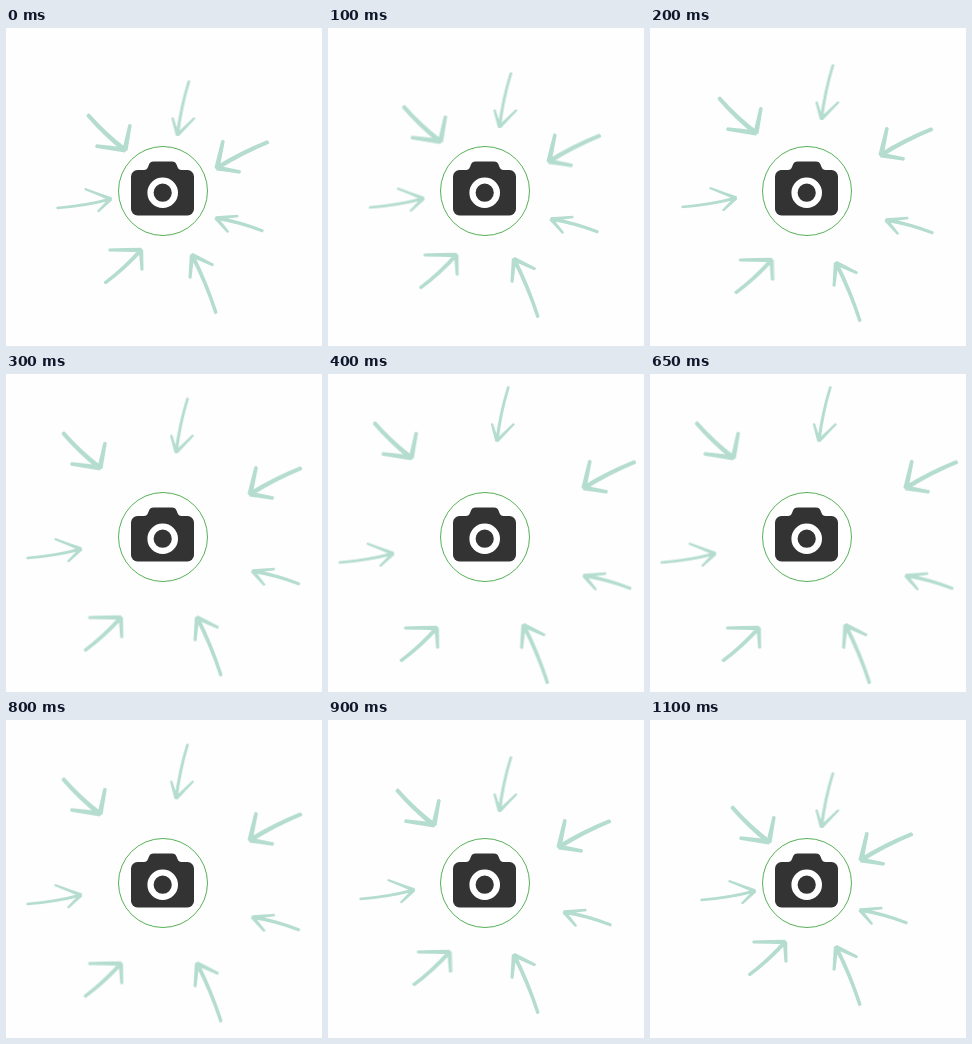
Write an HTML page that moves like this. It is 316x318 px and loops after 1.2 s.

```html
<!DOCTYPE html>
<html lang="en">
<head>
<meta charset="utf-8">
<title>Camera with pulsing arrows</title>
<style>
  html, body { margin: 0; width: 100%; height: 100%; overflow: hidden; background: #fefefe; }
  svg { display: block; width: 316px; height: 318px; }
</style>
</head>
<body>
<svg viewBox="0 0 316 318">
  <g id="arrows" fill="#b4dccf"></g>
  <circle cx="157" cy="163" r="44.5" fill="#fff" stroke="#45a845" stroke-width=".9"/>
  <g fill="#333">
    <rect x="125" y="142" width="63" height="45.5" rx="6.5"/>
    <path d="M138 142 Q141 142 142 139 L143 136.500 Q144 133.500 147.500 133.500 H166 Q169.500 133.500 170.500 136.500 L171.500 139 Q172.500 142 175.500 142 V144 H138 Z"/>
    <circle cx="156.700" cy="164.700" r="12.200" stroke="#fff" stroke-width="6.200"/>
  </g>
</svg>
<script>
const LOOP = 1200, FAR = 5, KNEE = 2;

// tail and barbs are relative to the tip; knee and far are where the tip has moved to.
const ARROWS = [
  { tip: [171.5, 107], tail: [11.5, -54], barbs: [[-5, -17], [17, -17]], knee: [0, -16], far: [-3.5, -49], width: 3.2 },
  { tip: [119, 122], tail: [-37, -35], barbs: [[5, -25], [-29, -4]], knee: [-13, -17], far: [-44, -46], width: 4.7 },
  { tip: [211, 140], tail: [51, -26], barbs: [[6, -27], [23, 4]], knee: [20, -13], far: [54, -31], width: 4.7 },
  { tip: [210, 190], tail: [47, 13], barbs: [[22, -2], [12, 14]], knee: [26, 2], far: [53, 15], width: 3.4 },
  { tip: [186, 227], tail: [24, 58], barbs: [[-2, 23], [21, 10]], knee: [0, 8], far: [13, 30], width: 4 },
  { tip: [135, 222], tail: [-36, 33], barbs: [[-32, 0], [1, 20]], knee: [-13.5, 10], far: [-31, 40], width: 4 },
  { tip: [105, 171], tail: [-54, 9], barbs: [[-26, -10], [-13, 12.5]], knee: [-19, -1], far: [-47.5, 12], width: 3.2 }
];

// Tapered brush stroke from an outer point to the tip, with an optional bend.
function brush([x, y], outer, inner, bend = 0) {
  const len = Math.hypot(x, y);
  const nx = -y / len, ny = x / len;
  const at = (t, side) => [x * t + nx * side, y * t + ny * side].map(v => v.toFixed(2)).join(" ");
  const a = outer / 2, b = inner / 2, mid = (a + b) / 2;
  return `M${at(1, a)} Q${at(.5, bend + mid)} ${at(0, b)}` +
    ` Q${at(-b / len, 0)} ${at(0, -b)}` +
    ` Q${at(.5, bend - mid)} ${at(1, -a)} Q${at(1 + a / len, 0)} ${at(1, a)}Z`;
}

// Even travel to the knee, then slowing slightly to the far point.
function offsetAt(pose, knee, far) {
  if (pose <= KNEE) return knee.map(v => v * pose / KNEE);
  const t = 1 - (1 - (pose - KNEE) / (FAR - KNEE)) ** 1.2;
  return knee.map((v, i) => v + (far[i] - v) * t);
}

// Out and back in equal steps, pausing at the far end.
function makeSteps(place) {
  const steps = [];
  for (let i = 0, ms = 0; ms < LOOP; i++) {
    const pose = FAR - Math.abs(FAR - i);
    steps.push({ offset: ms / LOOP, transform: place(pose), easing: "step-end" });
    ms += i === FAR || i === FAR + 1 ? 150 : 100;
  }
  return [...steps, { offset: 1, transform: place(0) }];
}

for (const { tip, tail, barbs, knee, far, width } of ARROWS) {
  const path = document.createElementNS("http://www.w3.org/2000/svg", "path");
  const shaft = brush(tail, width * .85, width, -2.5);
  const head = barbs.map(barb => brush(barb, width * .75, width * 1.1));
  path.setAttribute("d", shaft + head.join(""));
  document.getElementById("arrows").append(path);

  const place = pose => {
    const [x, y] = offsetAt(pose, knee, far).map((v, i) => v + tip[i]);
    return `translate(${x}px, ${y}px)`;
  };
  path.animate(makeSteps(place), { duration: LOOP, iterations: Infinity });
}
</script>
</body>
</html>
```
